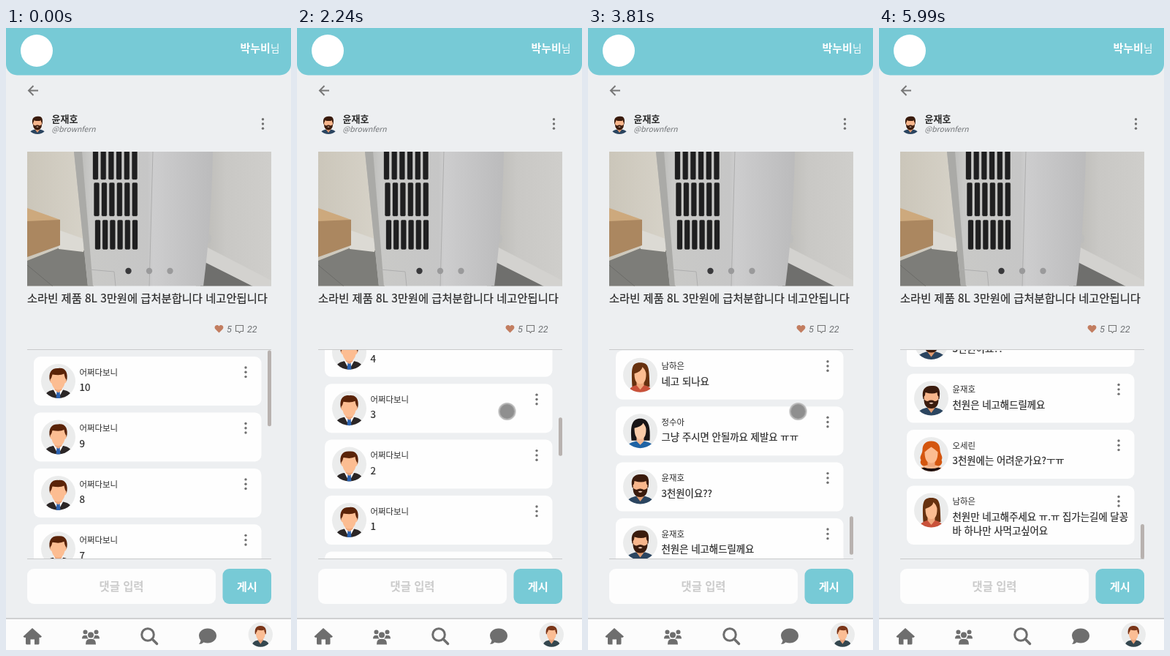
An HTML page that plays this animation: 390 px wide and 850 px high, repeating every 6.06 s.

```html
<!DOCTYPE html>
<html lang="ko">
<head>
<meta charset="utf-8">
<title>댓글 목록</title>
<style>
@property --scroll { syntax: '<number>'; inherits: true; initial-value: 0; }
@property --height { syntax: '<number>'; inherits: true; initial-value: 783; }

html, body { margin: 0; width: 100%; height: 100%; overflow: hidden; background: #edeff1; }
svg { display: block; }
text { font-family: "Noto Sans CJK KR", "Noto Sans KR", "Noto Sans", sans-serif; fill: #2b2b2b; }
.medium { font-weight: 500; stroke: #2b2b2b; stroke-width: .22px; }
.bold { font-weight: 700; }
.name { font-size: 11.4px; }
.body { font-size: 13.4px; }
.slant { font-style: italic; fill: #6f7275; }
.count { font: italic 12.6px Roboto, sans-serif; }
.teal { fill: #77cad6; }
.icon { fill: #6e6e6e; }

#stage { animation: scroll 6060ms steps(3) infinite, load 6060ms step-end infinite; }
#list { transform: translateY(calc(var(--scroll) * -1px)); }
#thumb {
  height: calc(285px * 285 / var(--height));
  transform: translateY(calc(285px * var(--scroll) / var(--height)));
}
#pointer { animation: point 6060ms steps(3) infinite, show 6060ms step-end infinite; }

@keyframes scroll {
  0% { --scroll: 0; }
  15.61% { --scroll: 0; animation-timing-function: steps(2); }
  17.921% { --scroll: 45; animation-timing-function: steps(5); }
  23.696% { --scroll: 260; animation-timing-function: steps(2); }
  26.007% { --scroll: 300; }
  30.132% { --scroll: 300; }
  34.191% { --scroll: 440; animation-timing-function: steps(2); }
  36.898% { --scroll: 498; }
  43.3% { --scroll: 498; animation-timing-function: steps(4); }
  48.036% { --scroll: 720; }
  51.584% { --scroll: 848; }
  54.719% { --scroll: 848; }
  58.185% { --scroll: 977; }
  61.65% { --scroll: 1200; animation-timing-function: steps(2); }
  63.96% { --scroll: 1263; }
  66.139% { --scroll: 1263; }
  69.571% { --scroll: 1324.5; animation-timing-function: steps(2); }
  71.716% { --scroll: 1363; }
  72.871% { --scroll: 1363; animation-timing-function: steps(2); }
  75.182% { --scroll: 1408; animation-timing-function: steps(2); }
  77.492%, 100% { --scroll: 1429; }
}
/* content height grows as further comments arrive */
@keyframes load {
  0% { --height: 783; }
  36.898% { --height: 1548; }
  63.96%, 100% { --height: 1714; }
}
@keyframes point {
  0%, 3.234% { transform: translate(310px, 777px); }
  6.7% { transform: translate(283px, 579px); }
  10% { transform: translate(283px, 579px); animation-timing-function: steps(4); }
  14.62% { transform: translate(287.5px, 524px); }
  80.97% { transform: translate(287.5px, 524px); animation-timing-function: steps(4); }
  85.512% { transform: translate(262px, 680px); animation-timing-function: steps(5); }
  91.188%, 100% { transform: translate(292px, 835px); }
}
@keyframes show {
  0% { opacity: 0; }
  3.234% { opacity: 1; }
  92.343%, 100% { opacity: 0; }
}
</style>
</head>
<body>
<svg id="stage" width="390" height="850" viewBox="0 0 390 850">
  <defs>
    <clipPath id="round"><circle r="23.5"/></clipPath>
    <clipPath id="frame"><rect x="29" y="169" width="334" height="183.5"/></clipPath>
    <linearGradient id="wall">
      <stop offset="0" stop-color="#cbc6ba"/><stop offset="1" stop-color="#d8d4ca"/>
    </linearGradient>
    <linearGradient id="shell">
      <stop offset="0" stop-color="#b4b4b1"/><stop offset=".12" stop-color="#c9c9c7"/>
      <stop offset=".53" stop-color="#c6c6c6"/><stop offset=".57" stop-color="#cdcdce"/>
      <stop offset="1" stop-color="#bbbbbc"/>
    </linearGradient>
    <linearGradient id="side">
      <stop offset="0" stop-color="#b9b8b4"/><stop offset=".4" stop-color="#c9c8c5"/>
      <stop offset="1" stop-color="#cfcecb"/>
    </linearGradient>

    <g id="kebab" fill="#707070"><circle cy="-6.3" r="1.7"/><circle r="1.7"/><circle cy="6.3" r="1.7"/></g>

    <g id="suit" clip-path="url(#round)">
      <path d="M-19 24Q-19 14-7 12H7Q19 14 19 24Z" fill="#2b2626"/>
      <path d="M-7 11L0 24 7 11Z" fill="#fff"/>
      <path d="M-2 14H2L3 24H-3Z" fill="#2b62b0"/>
      <path d="M-5 6H5V12L0 16-5 12Z" fill="#eda67a"/>
      <path d="M-11.5 0C-14-12-9-18 0-17.500C10-19 14-11 11.500 0Z" fill="#5a2308"/>
      <path d="M-11-2Q-9-4-8-9Q3-7 8-10Q9-4 11-2Q12 2 9 3Q7 12 0 12Q-7 12-9 3Q-12 2-11-2Z" fill="#fcbd92"/>
    </g>
    <g id="beard" clip-path="url(#round)">
      <path d="M-20 24Q-19 16-7 13H7Q19 16 20 24Z" fill="#2b4560"/>
      <path d="M-6 12L0 20 6 12V6H-6Z" fill="#e39c70"/>
      <path d="M-11 1C-14-12-8-17.500 1-17C11-18 13-11 11 1Z" fill="#3a1b0d"/>
      <path d="M-10-2Q-8-4-8-8Q2-5 8-8Q8-4 10-2L9 7H-9Z" fill="#f8b68c"/>
      <path d="M-10 1Q-8 4-5 4Q0 1 5 4Q8 4 10 1Q10 14 0 14Q-10 14-10 1Z" fill="#3a1b0d"/>
      <path d="M-3 6.500Q0 5 3 6.500Q0 9 -3 6.500Z" fill="#f4d5c4"/>
    </g>
    <g id="bob" clip-path="url(#round)">
      <path d="M-12 13C-14-8-11-17 0-17C11-17 14-8 13 13Z" fill="#181416"/>
      <path d="M-20 24Q-18 16-6 14H6Q18 16 20 24Z" fill="#1f63a4"/>
      <path d="M-5 6H5V14L0 19-5 14Z" fill="#f0b895"/>
      <path d="M-8-4Q2-6 4-11Q8-6 8-2Q8 11 0 11Q-8 11-8-4Z" fill="#f9cba9"/>
    </g>
    <g id="curl" clip-path="url(#round)">
      <path d="M0-18C9-18 12-12 12-6C12 0 17 3 14 8C17 13 11 18 6 16H-6C-11 18-17 13-14 8C-17 3-12 0-12-6C-12-12-9-18 0-18Z" fill="#d4560f"/>
      <path d="M-18 24Q-16 17-6 15H6Q16 17 18 24Z" fill="#f9b98e"/>
      <path d="M-18 24Q-15 19-10 18Q0 21 10 18Q15 19 18 24Z" fill="#1d1010"/>
      <path d="M-5 6H5V17H-5Z" fill="#f0a77c"/>
      <path d="M-9-3Q-6-6 0-10Q6-6 9-3Q9 12 0 12Q-9 12-9-3Z" fill="#fcbd92"/>
    </g>
    <g id="long" clip-path="url(#round)">
      <path d="M-11 16C-12-8-13-17 0-17C13-17 12-8 13 16Z" fill="#67310f"/>
      <path d="M-16 24Q-15 16-6 14H6Q15 16 16 24Z" fill="#c9523a"/>
      <path d="M-5 7H5V14L0 20-5 14Z" fill="#f0a77c"/>
      <path d="M-8-2Q2-5 3-11Q8-6 8-1Q8 12 0 12Q-8 12-8-2Z" fill="#fcbd92"/>
    </g>
    <g id="plain" clip-path="url(#round)">
      <path d="M-17 24Q-17 13-6 11H6Q17 13 17 24Z" fill="#34474f"/>
      <path d="M-5 5H5V11L0 18-5 11Z" fill="#e8a27a"/>
      <path d="M-10.500-1C-12-13-7-17.500 0-17C9-17.500 12-10 10.500-1Z" fill="#7a3518"/>
      <path d="M-9-3Q-7-5-6-9Q3-7 7-9Q7-5 9-3Q9 10 0 10.500Q-9 10-9-3Z" fill="#fbbd94"/>
    </g>
  </defs>

  <rect width="390" height="850" fill="#edeff1"/>
  <rect class="teal" y="-20" width="390" height="84.500" rx="15"/>
  <circle cx="42" cy="31" r="22" fill="#fff"/>
  <text x="320.500" y="33" class="bold" style="font-size:15px;fill:#fff">박누비<tspan style="font-size:13.500px;font-weight:400">님</tspan></text>

  <path d="M44 85.500H31M37.500 79L31 85.500 37.500 92" fill="none" stroke="#777" stroke-width="2"/>
  <use href="#beard" transform="translate(43 131) scale(.6)"/>
  <text x="62.500" y="129" class="bold" style="font-size:13px">윤재호</text>
  <text x="62.500" y="142" class="slant" style="font-size:10.300px">@brownfern</text>
  <use href="#kebab" x="351.500" y="131"/>

  <g clip-path="url(#frame)">
    <path d="M29 169H120V353H29Z" fill="url(#wall)"/>
    <path d="M260 169H363V353H260Z" fill="url(#side)"/>
    <path d="M29 353V318L74 300 120 306V353Z" fill="#7d7d79"/>
    <path d="M29 324L64 353" stroke="#6b6b68"/>
    <path d="M72 276L106 288V306L72 302Z" fill="#dcdad4"/>
    <path d="M29 246L74 262 29 270Z" fill="#cda97d"/>
    <path d="M29 264L74 262V297L29 313Z" fill="#ab8760"/>
    <path d="M266 316L338 353H266Z" fill="#6f6f6d"/>
    <path d="M272 298L363 345V353H338L268 318Z" fill="#d3d2cf"/>
    <path d="M274 278Q285 285 279 294L272 292Z" fill="#bdbdbc"/>
    <path d="M93 169H283Q281 270 270 353H112Z" fill="url(#shell)"/>
    <path d="M93 169H104L119 353H112Z" fill="#aaaaa7"/>
    <path d="M201 169L196 353M113 330L148 333 150 353" fill="none" stroke="#aeaeae"/>
    <g id="grill" fill="#1f1f20" stroke="#d8d8d6" stroke-width=".6"></g>
  </g>
  <circle cx="167.500" cy="332" r="4.200" fill="#39393b"/>
  <circle cx="196" cy="332" r="4.200" fill="#9a9a9b"/>
  <circle cx="224.500" cy="332" r="4.200" fill="#9a9a9b"/>

  <text x="29" y="375" class="medium" style="font-size:15.330px">소라빈 제품 8L 3만원에 급처분합니다 네고안됩니다</text>
  <path d="M291.500 416.500L286.500 411.500C283.500 408 288.500 403.500 291.500 407.500C294.500 403.500 299.500 408 296.500 411.500Z" fill="#c27d60"/>
  <text x="302" y="416" class="slant count">5</text>
  <path d="M314.500 406.500H324.500V414.500H321L319.500 416.500 318 414.500H314.500Z" fill="none" stroke="#777" stroke-width="1.100"/>
  <text x="330" y="416" class="slant count">22</text>

  <svg y="440" width="390" height="285" overflow="hidden"><g id="list"></g></svg>
  <path d="M29 439.500H363M29 725.500H363" stroke="#c9cacb"/>
  <rect id="thumb" x="358" y="440.500" width="5" rx="2.500" fill="#b8b2af"/>

  <rect x="29" y="739" width="258" height="48" rx="9" fill="#fdfdfd"/>
  <text x="158" y="768.500" text-anchor="middle" class="bold" style="font-size:15.400px;fill:#cbcbcb">댓글 입력</text>
  <rect class="teal" x="296.500" y="739" width="66.500" height="48" rx="9"/>
  <text x="329.800" y="768.500" text-anchor="middle" class="bold" style="font-size:15.300px;fill:#fff">게시</text>

  <rect y="806" width="390" height="44" fill="#fcfcfc"/>
  <rect y="806" width="390" height="2" fill="#cfd0d1"/>
  <g class="icon">
    <path d="M36 820L49 831.500 47.500 833H45.500V841Q45.500 842.500 44 842.500H39V835.500H33.500V842.500H28.500Q27 842.500 27 841V833H25L23.500 831.500Z"/>
    <circle cx="116" cy="829.500" r="4"/><circle cx="108.500" cy="825.500" r="3"/><circle cx="123.500" cy="825.500" r="3"/>
    <path d="M109 842.500Q109 835 114 835H118Q123 835 123 842.500Z"/>
    <path d="M104 834.500Q104 830 107.500 830H110.500Q111 833 113 834.500ZM128 834.500Q128 830 124.500 830H121.500Q121 833 119 834.500Z"/>
    <path d="M276 820.500C283 820.500 288 825 288 830.500C288 836 283 840.500 276 840.500Q273 840.500 270.500 839.500Q268 842 264 842Q266 839.500 266.500 837Q264 834 264 830.500C264 825 269 820.500 276 820.500Z"/>
  </g>
  <path d="M200 835L206.500 841.500" stroke="#6e6e6e" stroke-width="3.500" stroke-linecap="round"/>
  <circle cx="194" cy="829" r="8.300" fill="none" stroke="#6e6e6e" stroke-width="3"/>
  <circle cx="348.300" cy="829" r="16.700" fill="#ebecec"/>
  <use href="#plain" transform="translate(348.300 829) scale(.71)"/>

  <g id="pointer"><circle r="11" fill="#8f8f8f" stroke="#b9b9b9" stroke-width="2"/></g>
</svg>

<script>
const people = {
  suit: '어쩌다보니', beard: '윤재호', bob: '정수아', curl: '오세린', long: '남하은'
};
const countdown = Array.from({ length: 10 }, (_, i) => ['suit', `${10 - i}`]);
const comments = [
  ...countdown,
  ['suit', '저요'],
  ['suit', '사고싶어요'],
  ['suit', '3만원 가능해요?'],
  ['beard', '3만3천원에 살게요'],
  ['beard', '남태오님 연락주세요'],
  ['beard', '그냥 줄 수 없습니다'],
  ['long', '네고 되나요'],
  ['bob', '그냥 주시면 안될까요 제발요 ㅠㅠ'],
  ['beard', '3천원이요??'],
  ['beard', '천원은 네고해드릴께요'],
  ['curl', '3천원에는 어려운가요?ㅜㅠ'],
  ['long', '천원만 네고해주세요 ㅠ.ㅠ 집가는길에 달꽁', '바 하나만 사먹고싶어요']
];

const card = ([who, ...lines], i) => `
  <g transform="translate(0 ${9 + i * 76.45})">
    <rect x="38" width="311.5" height="${lines.length > 1 ? 80.5 : 67}" rx="9" fill="#fefefe"/>
    <circle cx="71.5" cy="33.5" r="23.5" fill="#ebecec"/>
    <use href="#${who}" x="71.5" y="33.5"/>
    <text x="100.5" y="25.7" class="name">${people[who]}</text>
    ${lines.map((line, n) => `<text x="100.5" y="${47.3 + n * 19}" class="body medium">${line}</text>`).join('')}
    <use href="#kebab" x="328" y="21.3"/>
  </g>`;
document.getElementById('list').innerHTML = comments.map(card).join('');

const rows = [[160, 47.5], [211, 46.5], [262, 41]];
document.getElementById('grill').innerHTML = rows.map(([y, h], r) =>
  Array.from({ length: 6 }, (_, c) =>
    `<rect x="${118.5 + r * 1.5 + c * (10.7 - r * 0.25)}" y="${y}" width="8" height="${h}" rx="2"/>`
  ).join('')).join('');
</script>
</body>
</html>
```
